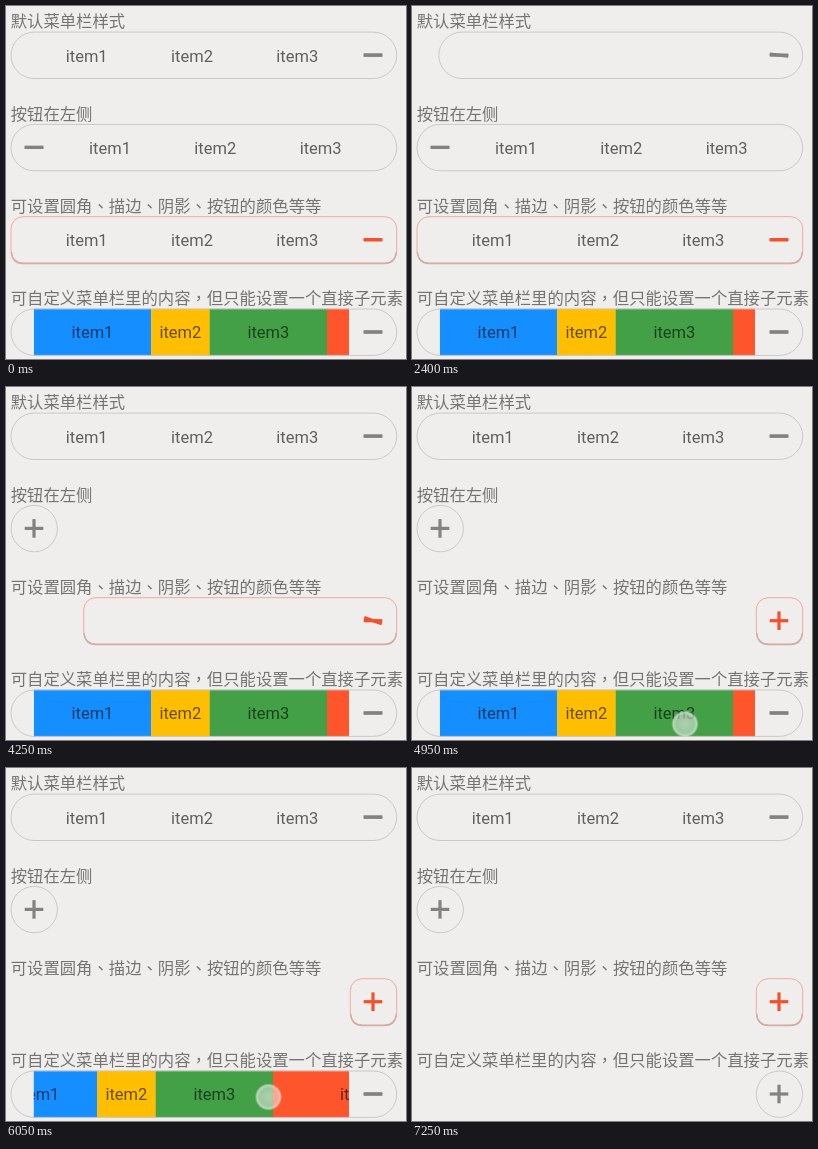
An HTML page that plays this animation: 400 px wide and 353 px high, repeating every 7.6 s.

```html
<!DOCTYPE html>
<html lang="zh-CN">
<head>
<meta charset="utf-8">
<title>Expandable menu bars</title>
<style>
  html, body { margin: 0; width: 100%; height: 100%; overflow: hidden; background: #efeeec; }
  svg { display: block; width: 400px; height: 353px; }
  .title { font: 16.35px "Noto Sans CJK SC", "Noto Sans CJK", sans-serif; fill: #757473; }
  .mark { font-family: "Noto Sans CJK TC", "Noto Sans CJK", sans-serif; }
  .item { font: 16.5px Roboto, "Noto Sans", sans-serif; fill: #000; fill-opacity: .6; text-anchor: middle; }
  .bar { fill: none; stroke: #c6c5c4; stroke-width: .9; }
  .icon { stroke: #838281; stroke-width: 3.2; }
  .warm .bar { stroke: #f2a196; }
  .warm .icon { stroke: #f4502e; }
  .shade { fill: none; stroke: #a3a2a1; stroke-width: 1.4; stroke-opacity: .75; }
</style>
</head>
<body>
<svg id="stage" viewBox="0 0 400 353">
  <defs>
    <radialGradient id="glow">
      <stop offset="0" stop-color="#eee" stop-opacity=".62"/>
      <stop offset=".65" stop-color="#eee" stop-opacity=".52"/>
      <stop offset=".86" stop-color="#f4f4f4" stop-opacity=".66"/>
      <stop offset="1" stop-color="#ccc" stop-opacity=".15"/>
    </radialGradient>
    <clipPath id="window"><rect x="27.8" y="302.7" width="315.2" height="46.8"/></clipPath>
  </defs>
</svg>
<script>
const LOOP = 7600, STEP = 50, MOVE = 700;
const LEFT = 5, RIGHT = 390.7, SIZE = 46.4, PITCH = 92.3;
const stage = document.getElementById('stage');

function add(parent, tag, attrs, text) {
  const el = document.createElementNS('http://www.w3.org/2000/svg', tag);
  for (const key in attrs) el.setAttribute(key, attrs[key]);
  if (text) el.textContent = text;
  parent.appendChild(el);
  return el;
}

// close / open: start times of the two motions
const rows = [
  { title: '默认菜单栏样式', close: 621, open: 1745 },
  { title: '按钮在左侧', close: 2851, onLeft: true },
  { title: '可设置圆角、描边、阴影、按钮的颜色等等', close: 4100, warm: true },
  { title: '可自定义菜单栏里的内容，但只能设置一个直接子元素', close: 6545, custom: true }
];
const blocks = [['#158fff', 117.3], ['#ffbf00', 58.6], ['#43a047', 117.3], ['#ff552c', 176]];

rows.forEach((row, i) => {
  const top = 26.1 + PITCH * i, mid = top + SIZE / 2;
  row.mid = mid;
  const group = add(stage, 'g', { class: row.warm ? 'warm' : '' });
  const title = add(group, 'text', { class: 'title', x: 4.7, y: 21.2 + PITCH * i });
  // punctuation sits in the middle of its square
  for (const part of row.title.split(/([，、])/))
    add(title, 'tspan', /[，、]/.test(part) ? { class: 'mark', lang: 'zh-TW' } : {}, part);

  row.content = add(group, 'g', {});
  if (row.custom) {
    row.content.setAttribute('clip-path', 'url(#window)');
    row.strip = add(row.content, 'g', {});
    let x = 27.8;
    blocks.forEach(([fill, width], n) => {
      add(row.strip, 'rect', { x, y: 302, width: width + .2, height: 48, fill });
      add(row.strip, 'text', { class: 'item', x: x + width / 2, y: mid + 6.2 }, 'item' + (n + 1));
      x += width;
    });
  } else {
    const first = row.onLeft ? 104 : 80.7;
    for (let n = 0; n < 3; n++)
      add(row.content, 'text', { class: 'item', x: first + 105.3 * n, y: mid + 6.2 }, 'item' + (n + 1));
  }
  if (row.warm) row.shade = add(group, 'path', { class: 'shade' });

  row.bar = add(group, 'rect', { class: 'bar', y: top, height: SIZE, rx: row.warm ? 12 : SIZE / 2 });
  const cx = row.onLeft ? 28 : 367;
  const icon = add(group, 'g', { class: 'icon', transform: `translate(${cx} ${mid - .2})` });
  add(icon, 'path', { d: 'M-9.3 0H9.3' });
  row.blade = add(icon, 'path', { d: 'M-9.3 0H9.3' });
});

const dot = add(stage, 'circle', { r: 13.5, fill: 'url(#glow)' });

// presses on the buttons: from, to, x, y
const taps = [
  [200, 621, 371, 53],
  [1500, 1745, 371, 53],
  [2600, 2851, 31, 145],
  [3650, 4100, 371, 238],
  [6350, 6640, 373, 333]
];

// drag over the last row: time, finger x, finger y, scroll
const drag = [
  [4950, 273, 337, 0],
  [5400, 219.5, 342, 105],
  [5650, 171, 339, 153],
  [6050, 262.5, 329, 54],
  [6250, 316, 331, 0]
];

const ramp = (t, from, span) => Math.min(1, Math.max(0, (t - from) / span));

function dragAt(t) {
  let n = 0;
  while (n < drag.length - 2 && t >= drag[n + 1][0]) n++;
  const a = drag[n], b = drag[n + 1], k = ramp(t, a[0], b[0] - a[0]);
  return a.map((v, j) => v + (b[j] - v) * k);
}

function draw(t) {
  for (const row of rows) {
    const p = ramp(t, row.close, MOVE) - (row.open ? ramp(t, row.open, MOVE) : 0);
    const width = RIGHT - LEFT - (RIGHT - LEFT - SIZE) * p;
    const x = row.onLeft ? LEFT : RIGHT - width;
    row.bar.setAttribute('x', x);
    row.bar.setAttribute('width', width);
    row.blade.setAttribute('transform', `rotate(${90 * p})`);
    row.content.setAttribute('visibility', p > 0 ? 'hidden' : 'visible');
    if (row.shade)
      row.shade.setAttribute('d', `M${x + .3} ${row.mid + 12}q1 11.6 12 11.6h${width - 24.6}q11 0 12-11.6`);
  }
  const [, x, y, scroll] = dragAt(t);
  rows[3].strip.setAttribute('transform', `translate(${-scroll} 0)`);

  const tap = taps.find(([from, to]) => t >= from && t < to);
  const dragging = t >= drag[0][0] && t <= drag[drag.length - 1][0];
  dot.setAttribute('visibility', tap || dragging ? 'visible' : 'hidden');
  dot.setAttribute('cx', tap ? tap[2] : x);
  dot.setAttribute('cy', tap ? tap[3] : y);
}

const start = performance.now();
function tick() {
  const t = (performance.now() - start) % LOOP;
  draw(Math.floor(t / STEP) * STEP);
  requestAnimationFrame(tick);
}
draw(0);
requestAnimationFrame(tick);
</script>
</body>
</html>
```
